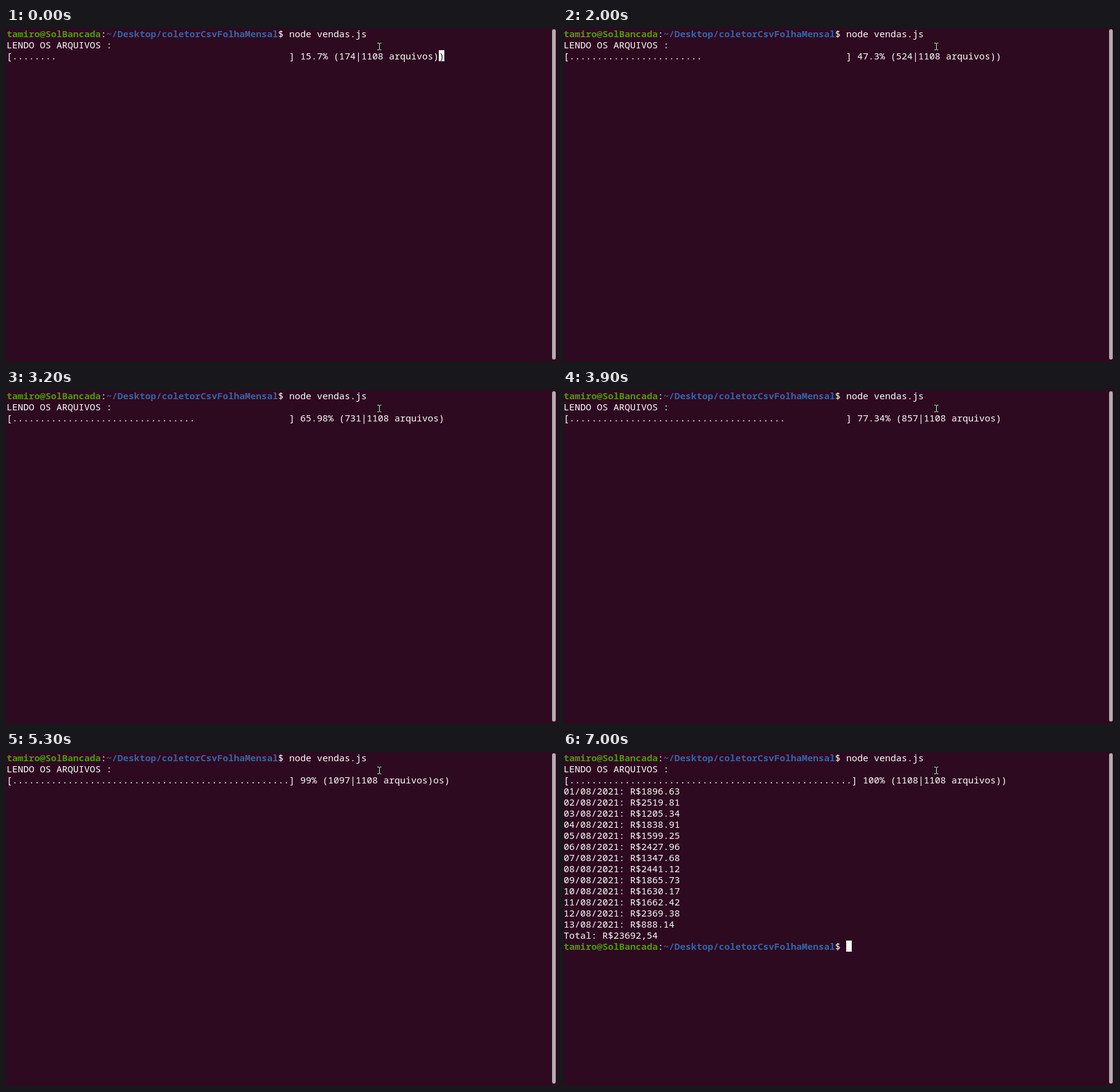
An HTML page with a canvas that plays this animation: 895x542 px, repeating every 8.1 s.

```html
<!DOCTYPE html>
<html lang="pt">
<head>
<meta charset="utf-8">
<title>Terminal</title>
<style>
html, body { margin: 0; width: 100%; height: 100%; overflow: hidden; background: #2d0a20; }
canvas { display: block; }
</style>
</head>
<body>
<canvas id="stage" width="895" height="542"></canvas>
<script>
const ctx = document.getElementById('stage').getContext('2d');

const LOOP = 8100, STEP = 100;
const DONE = 5400, PROMPT_BACK = 5500, LAST_CHANGE = 7000;
const BLINK_START = 5700, BLINK = 610;
const COL = 9, ROW = 18, LEFT = 1;
const BG = '#2d0a20', WHITE = '#ffffff', GREEN = '#4e9a06', BLUE = '#3465a4', GRAY = '#b3adb0';
const FONT = '15px "Noto Sans Mono", "DejaVu Sans Mono", monospace';

const FILES = 1108;
const BAR = 50;
const USER = 'tamiro@SolBancada';
const FOLDER = '~/Desktop/coletorCsvFolhaMensal';
const PROMPT_LENGTH = USER.length + FOLDER.length + 3;

// [time, files read]
const progress = [[0, 174], [800, 321], [2000, 524], [2600, 634], [3600, 796], [3900, 857], [5300, 1097], [DONE, FILES]];
const sales = ['1896.63', '2519.81', '1205.34', '1838.91', '1599.25', '2427.96', '1347.68',
  '2441.12', '1865.73', '1630.17', '1662.42', '2369.38', '888.14'];

function write(text, col, row, color = WHITE, bold = false) {
  ctx.font = (bold ? 'bold ' : '') + FONT;
  ctx.fillStyle = color;
  ctx.fillText(text, LEFT + col * COL, row * ROW + 15);
}

function writePrompt(row) {
  write(USER, 0, row, GREEN, true);
  write(':', USER.length, row);
  write(FOLDER, USER.length + 1, row, BLUE, true);
  write('$', PROMPT_LENGTH - 2, row);
}

function drawCursor(col, row, under = '') {
  ctx.fillStyle = WHITE;
  ctx.fillRect(LEFT + col * COL, row * ROW, COL, ROW);
  if (under) write(under, col, row, BG);
}

function filesRead(t) {
  const i = progress.findIndex(([time]) => time >= t);
  if (i < 0) return FILES;
  if (i === 0) return progress[0][1];
  const [t0, n0] = progress[i - 1], [t1, n1] = progress[i];
  return Math.round(n0 + (n1 - n0) * (t - t0) / (t1 - t0));
}

// Each print overwrites the row in place, so the tail of a longer print stays visible.
function progressLine(n) {
  const half = (n / FILES * BAR).toFixed(2);
  const percent = +(half * 2).toFixed(2);
  const dots = '.'.repeat(Math.floor(half) + 1);
  const text = `[${dots.padEnd(BAR)}] ${percent}% (${n}|${FILES} arquivos)`;
  const longest = BAR + 26 + String(n).length;
  const tail = 'arquivos)'.slice(9 - Math.max(0, longest - text.length));
  return { text, tail: text.length < longest ? tail : '' };
}

function drawPointer() {
  const beam = (grow) => {
    ctx.fillRect(603 - grow, 24 - grow, 3 + 2 * grow, 1 + 2 * grow);
    ctx.fillRect(607 - grow, 24 - grow, 3 + 2 * grow, 1 + 2 * grow);
    ctx.fillRect(606 - grow, 25 - grow, 1 + 2 * grow, 10 + 2 * grow);
    ctx.fillRect(603 - grow, 35 - grow, 3 + 2 * grow, 1 + 2 * grow);
    ctx.fillRect(607 - grow, 35 - grow, 3 + 2 * grow, 1 + 2 * grow);
  };
  ctx.fillStyle = '#000000';
  beam(1);
  ctx.fillStyle = WHITE;
  beam(0);
}

function drawScrollbar() {
  ctx.fillStyle = GRAY;
  ctx.beginPath();
  ctx.roundRect(887, 2, 6, 536, 3);
  ctx.fill();
}

function draw(time) {
  const t = Math.min(Math.floor(time / STEP) * STEP, LAST_CHANGE);
  const cursorOn = Math.floor((t - BLINK_START) / BLINK) % 2 === 0;

  ctx.fillStyle = BG;
  ctx.fillRect(0, 0, 895, 542);
  writePrompt(0);
  write('node vendas.js', PROMPT_LENGTH, 0);
  write('LENDO OS ARQUIVOS :', 0, 1);

  const { text, tail } = progressLine(filesRead(t));
  write(text + tail, 0, 2);

  if (t < DONE) {
    if (cursorOn) drawCursor(text.length, 2, tail[0]);
  } else {
    sales.forEach((value, i) => {
      write(`${String(i + 1).padStart(2, '0')}/08/2021: R$${value}`, 0, 3 + i);
    });
    write('Total: R$23692,54', 0, 16);
    if (t >= PROMPT_BACK) {
      writePrompt(17);
      if (cursorOn) drawCursor(PROMPT_LENGTH, 17);
    }
  }

  drawScrollbar();
  drawPointer();
}

function tick() {
  draw(performance.now() % LOOP);
  requestAnimationFrame(tick);
}
tick();
</script>
</body>
</html>
```
